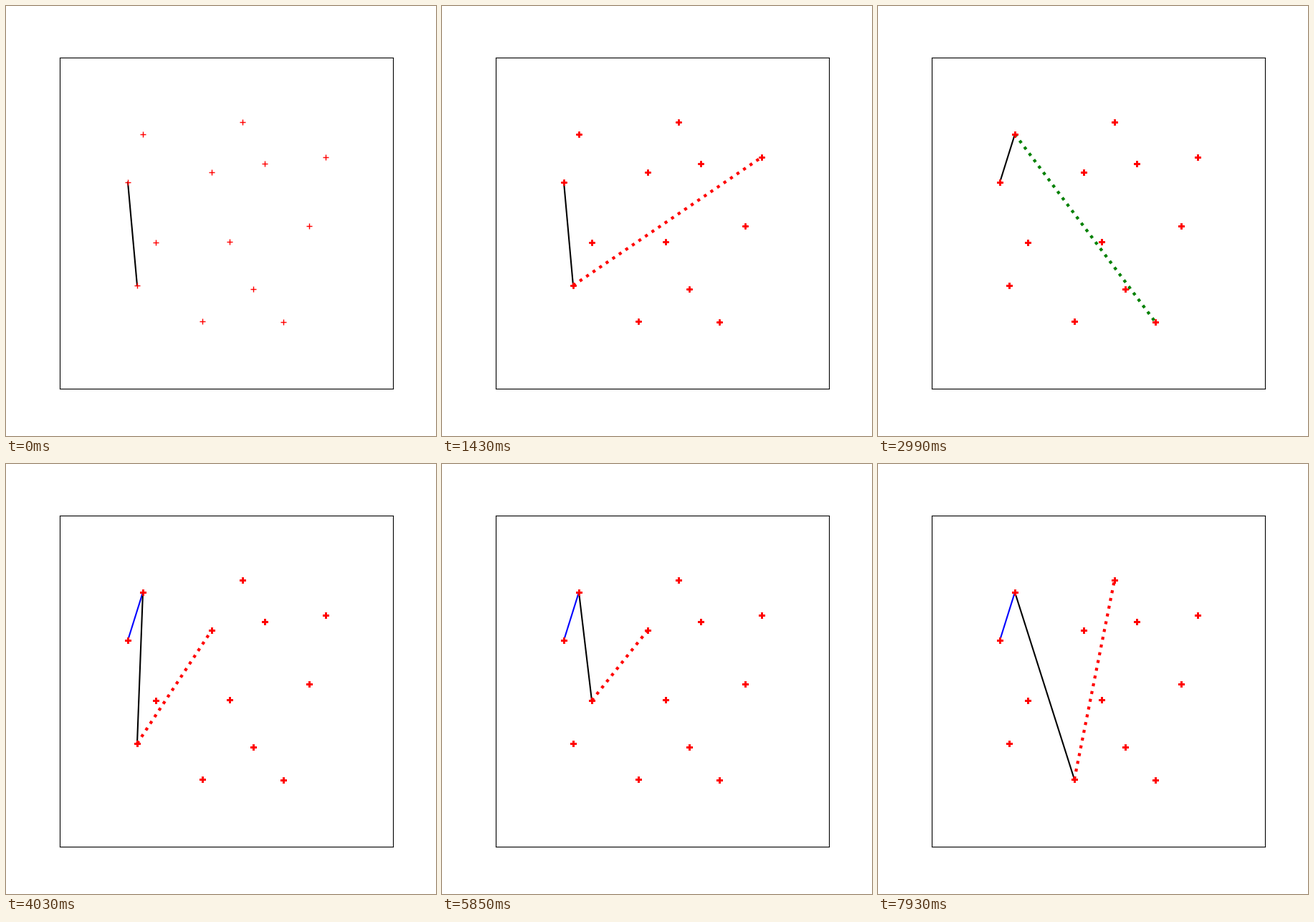
Recreate the animation shown at these times as a matplotlib script. Size 600x600 px, loop 8000 ms.

```python
"""Brute-force convex hull: each candidate edge is tested against every point."""
from itertools import islice

import matplotlib.pyplot as plt
import numpy as np
from matplotlib.animation import FuncAnimation

LOOP, STEP, TICK = 8000, 130, 20   # ms
N_STEPS = -(-LOOP // STEP)

# Positions in stage pixels, sorted by x
PTS = np.array([
    (170, 246), (183, 390), (191, 179), (209, 330), (274, 440),
    (287, 232), (312, 329), (330, 162), (345, 395), (361, 220),
    (387, 441), (423, 307), (446, 211),
])


def is_right_turn(p, q, r):
    (ax, ay), (bx, by) = PTS[q] - PTS[p], PTS[r] - PTS[p]
    return ax * by - ay * bx > 0


def search():
    """Yield (hull, edge, edge style, probe, probe colour) for each step."""
    hull = [0]
    while True:
        p = hull[-1]
        for q in range(len(PTS)):
            if q in hull:
                continue
            path, edge, good = tuple(hull), (p, q), True
            yield path, edge, "-", (), "r"
            for r in range(len(PTS)):
                if r in edge:
                    continue
                ok = is_right_turn(p, q, r)
                good = good and ok
                yield path, edge, "-", (q, r), "g" if ok else "r"
            if good:
                hull.append(q)
                yield tuple(hull), (), "-", (), "r"
                break
            yield path, edge, "--", (), "r"
            yield path, (), "-", (), "r"
        else:
            return


STEPS = list(islice(search(), N_STEPS))

fig, ax = plt.subplots(figsize=(6, 6), dpi=100)
fig.subplots_adjust(left=0.125, right=0.9, bottom=0.11, top=0.88)
ax.set(xlim=(75, 540), ylim=(534, 72), xticks=[], yticks=[])

hull_line, = ax.plot([], [], "b-", lw=1.5)
edge_line, = ax.plot([], [], "k-", lw=1.5)
probe_line, = ax.plot([], [], "r:", lw=3)
marks, = ax.plot([], [], "r+", ms=6, zorder=3)


def place(line, ids):
    line.set_data(*PTS[list(ids)].T if ids else ([], []))


def draw(i):
    k = min((i * TICK + TICK // 2) // STEP, N_STEPS - 1)
    hull, edge, style, probe, color = STEPS[k]
    place(hull_line, hull if len(hull) > 1 else ())
    place(edge_line, edge)
    edge_line.set_linestyle(style)
    place(probe_line, probe)
    probe_line.set_color(color)
    # Markers pile up with each step, so their soft edges fill in
    marks.set_data(*np.tile(PTS, (k + 1, 1)).T)
    return hull_line, edge_line, probe_line, marks


anim = FuncAnimation(fig, draw, frames=LOOP // TICK, interval=TICK,
                     repeat=True, repeat_delay=0)
plt.show()
```
